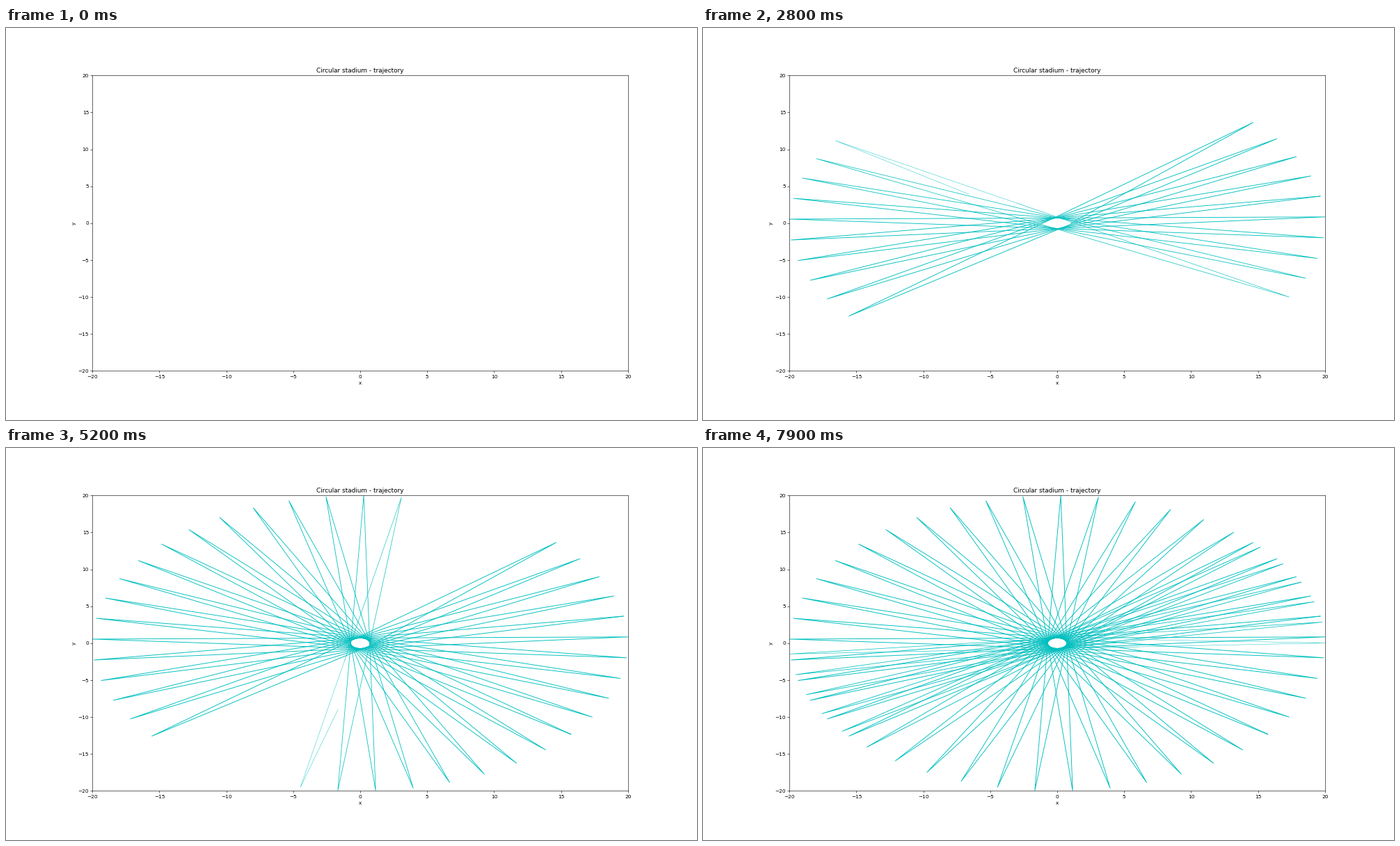
A matplotlib script for the animation above (8 s loop, 993x564 px).

```python
import numpy as np
import matplotlib.pyplot as plt
from matplotlib.animation import FuncAnimation
from matplotlib.collections import LineCollection

W, H, DPI = 993, 564, 53.4
FRAMES, INTERVAL = 80, 100
RADIUS = 20
SPEED = 28.256          # path length covered per frame
THIN, SCALE = 0.8, 0.534  # width of a single stroke and pixel scale


def bounce_path(count):
    """Start point followed by the wall hits of a ball in a circle."""
    start = np.array([1.0, 0.0])
    d = np.sqrt(0.5)
    reach = np.sqrt(RADIUS**2 - d**2) - d
    first = start + reach * d
    turn = 2 * np.arccos(d / RADIUS)
    ang = np.arctan2(first[1], first[0]) + turn * np.arange(count)
    hits = RADIUS * np.column_stack([np.cos(ang), np.sin(ang)])
    return np.vstack([start, hits])


path = bounce_path(60)
dist = np.r_[0, np.cumsum(np.hypot(*np.diff(path, axis=0).T))]


def point(s):
    return [np.interp(s, dist, path[:, 0]), np.interp(s, dist, path[:, 1])]


def piece(k):
    """Part of the path travelled during step k, corners included."""
    a, b = k * SPEED, (k + 1) * SPEED
    corners = path[(dist > a) & (dist < b)]
    return np.vstack([point(a), corners, point(b)])


def stroke_width(age):
    """Repeated antialiased strokes grow towards a solid, wider line."""
    rest = 1 - THIN
    core = rest * (1 - rest**age)
    edge = 2 * (THIN - (1 - rest**(age + 1)) / (age + 1))
    return (core + edge) * SCALE * 72 / DPI


pieces = [piece(k) for k in range(FRAMES - 1)]

fig = plt.figure(figsize=((W + 0.01) / DPI, (H + 0.01) / DPI), dpi=DPI)
left, right, top, bottom = 124.3, 893.8, 68.3, 493.5
ax = fig.add_axes([left / W, 1 - bottom / H, (right - left) / W, (bottom - top) / H])
ax.set(xlim=(-20, 20), ylim=(-20, 20), xlabel="x", ylabel="y",
       title="Circular stadium - trajectory")
trail = LineCollection([], colors="c", zorder=2)
ax.add_collection(trail, autolim=False)


def update(n):
    trail.set_segments(pieces[:n])
    trail.set_linewidths(stroke_width(np.arange(n, 0, -1)) if n else [1])
    return (trail,)


anim = FuncAnimation(fig, update, frames=FRAMES, interval=INTERVAL,
                     repeat=True, repeat_delay=0, init_func=lambda: update(0))
plt.show()
```
